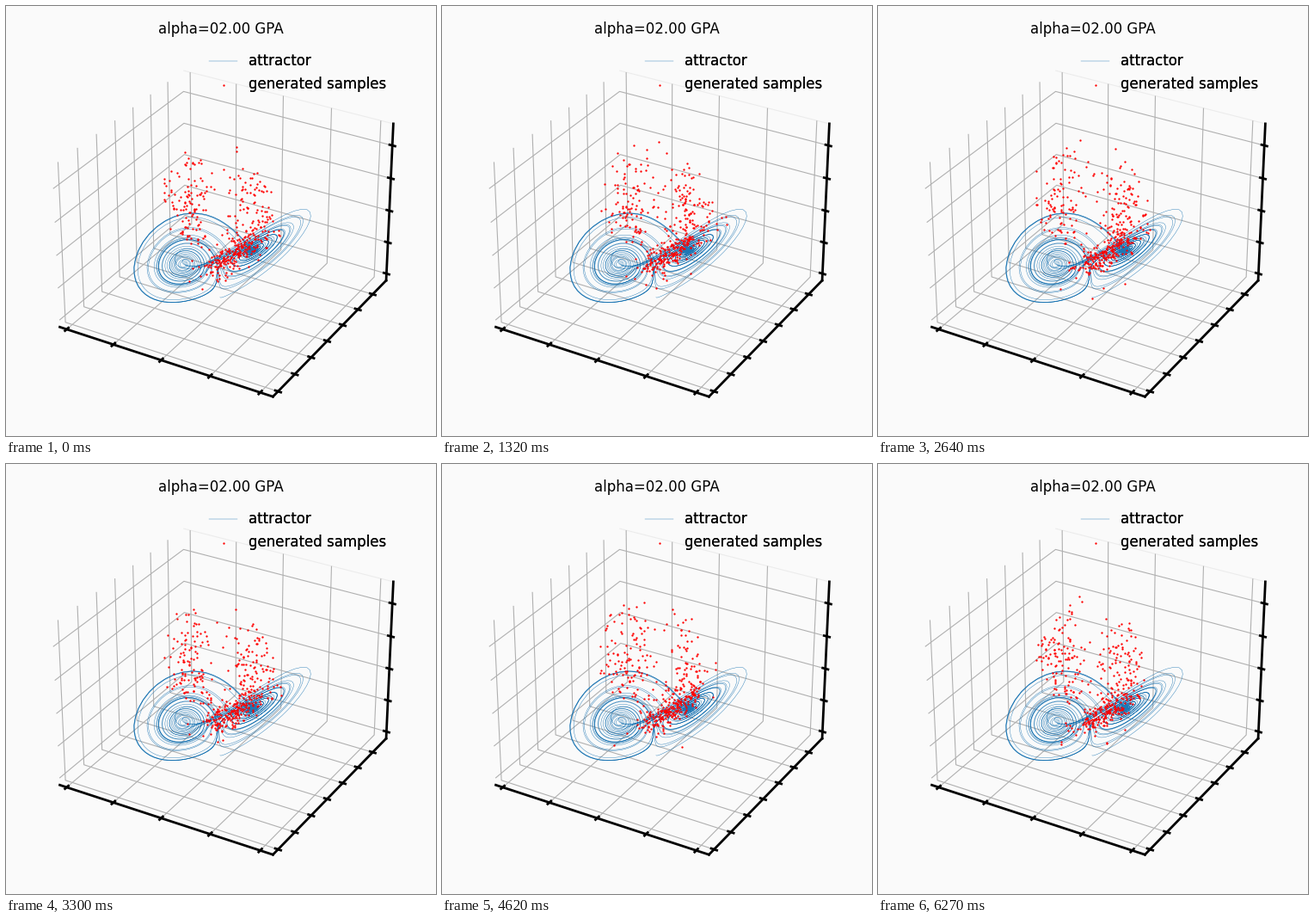
A matplotlib script that plays this animation: 500x500 px, repeating every 6.6 s.

```python
import numpy as np
import matplotlib.pyplot as plt
from matplotlib.animation import FuncAnimation
from matplotlib.collections import LineCollection

SIZE, FRAMES, STEP_MS = 500, 20, 330
BG, GRID, PANE = "#fafafa", "#b0b0b0", "#ececec"

# axis limits of the 3D box and its ticks
LO = np.array([-43.0, -33.0, -4.4])
HI = np.array([45.0, 39.3, 93.0])
TICKS = [np.arange(-40, 41, 20), np.arange(-30, 31, 10), np.arange(0, 81, 20)]

BOX = np.array([4, 4, 3]) * 0.29762
SCALE, CENTRE, DIST = 2385, (255.8, 255.5), 10
ELEV, AZIM = np.radians(30), np.radians(-60)


def project(p):
    """Perspective view of data points, in stage pixels."""
    q = ((np.asarray(p, float) - LO) / (HI - LO) - 0.5) * BOX
    eye = np.array([np.cos(ELEV) * np.cos(AZIM),
                    np.cos(ELEV) * np.sin(AZIM), np.sin(ELEV)])
    right = np.array([-np.sin(AZIM), np.cos(AZIM), 0])
    up = np.cross(eye, right)
    depth = DIST - q @ eye
    return np.stack([CENTRE[0] + SCALE * (q @ right) / depth,
                     CENTRE[1] - SCALE * (q @ up) / depth], axis=-1)


def lorenz(start=(0.0, 1.0, 1.05), dt=0.01, steps=5000):
    """Lorenz path by plain Euler steps."""
    path = np.empty((steps, 3))
    x, y, z = start
    for i in range(steps):
        path[i] = x, y, z
        x, y, z = (x + dt * 10 * (y - x),
                   y + dt * (x * (28 - z) - y),
                   z + dt * (x * y - 8 / 3 * z))
    return path


fig = plt.figure(figsize=(SIZE / 100, SIZE / 100), dpi=100, facecolor=BG)
ax = fig.add_axes([0, 0, 1, 1])
ax.set_xlim(0, SIZE)
ax.set_ylim(SIZE, 0)
ax.axis("off")


def add_lines(lines, color, width, z, cap="butt"):
    ax.add_collection(LineCollection([project(l) for l in lines], colors=color,
                                     linewidths=width, zorder=z, capstyle=cap))


(x0, y0, z0), (x1, y1, z1) = LO, HI
xs, ys, zs = TICKS
dx, dy = (x1 - x0) / 80, (y1 - y0) / 80

grid = [[(x, y0, z0), (x, y1, z0), (x, y1, z1)] for x in xs]
grid += [[(x1, y, z0), (x0, y, z0), (x0, y, z1)] for y in ys]
grid += [[(x0, y0, z), (x0, y1, z), (x1, y1, z)] for z in zs]
edges = [[(x0, y0, z0), (x1, y0, z0)], [(x1, y0, z0), (x1, y1, z0)],
         [(x1, y1, z0), (x1, y1, z1)]]
marks = [[(x, y0 - dy, z0), (x, y0 + dy, z0)] for x in xs]
marks += [[(x1 + dx, y, z0), (x1 - dx, y, z0)] for y in ys]
marks += [[(x1 + dx, y1, z), (x1 - dx, y1, z)] for z in zs]

add_lines([[(x0, y1, z1), (x1, y1, z1)]], PANE, 0.8, 1)
add_lines(grid, GRID, 0.8, 2)
add_lines(edges + marks, "black", 2, 3, "projecting")

BLUE = dict(color="tab:blue", lw=0.3, zorder=4)
DOT = dict(s=2.8, c="red", linewidths=0, zorder=5)
ax.plot(*project(lorenz()).T, **BLUE)

# title and legend; legend labels are laid down twice, so they look heavier
fig.text(0.5, 1 - 32.5 / SIZE, "alpha=02.00 GPA", size=12, ha="center")
ax.plot([235.5, 269], [63.5, 63.5], **BLUE)
ax.scatter([252.5], [91.5], **DOT)
for label, base in (("attractor", 69), ("generated samples", 96)):
    for _ in range(2):
        fig.text(282.2 / SIZE, 1 - base / SIZE, label, size=12)


def samples(i, core=190, plume=230):
    """A fresh cloud: a dense slanted core under a two-armed plume."""
    rng = np.random.default_rng(40 + i)
    along = rng.normal(size=core)
    cx = 263 + 18 * along + 5 * rng.standard_t(6, core)
    cy = 289 - 10 * along + 7 * rng.standard_t(6, core)

    side = rng.choice([-1, 1], plume)
    px = np.clip(250 + side * rng.normal(34, 15, plume), 184, 330)
    roof = 148 + (px - 240) ** 2 / 90
    floor = 300 - 0.6 * np.abs(px - 255)
    py = floor + (roof - floor) * rng.beta(1.4, 2.0, plume)
    return np.column_stack([np.r_[cx, px], np.r_[cy, py]])


dots = ax.scatter([], [], **DOT)


def draw(i):
    dots.set_offsets(samples(i))
    return [dots]


anim = FuncAnimation(fig, draw, frames=FRAMES, interval=STEP_MS,
                     repeat=True, repeat_delay=0)
plt.show()
```
